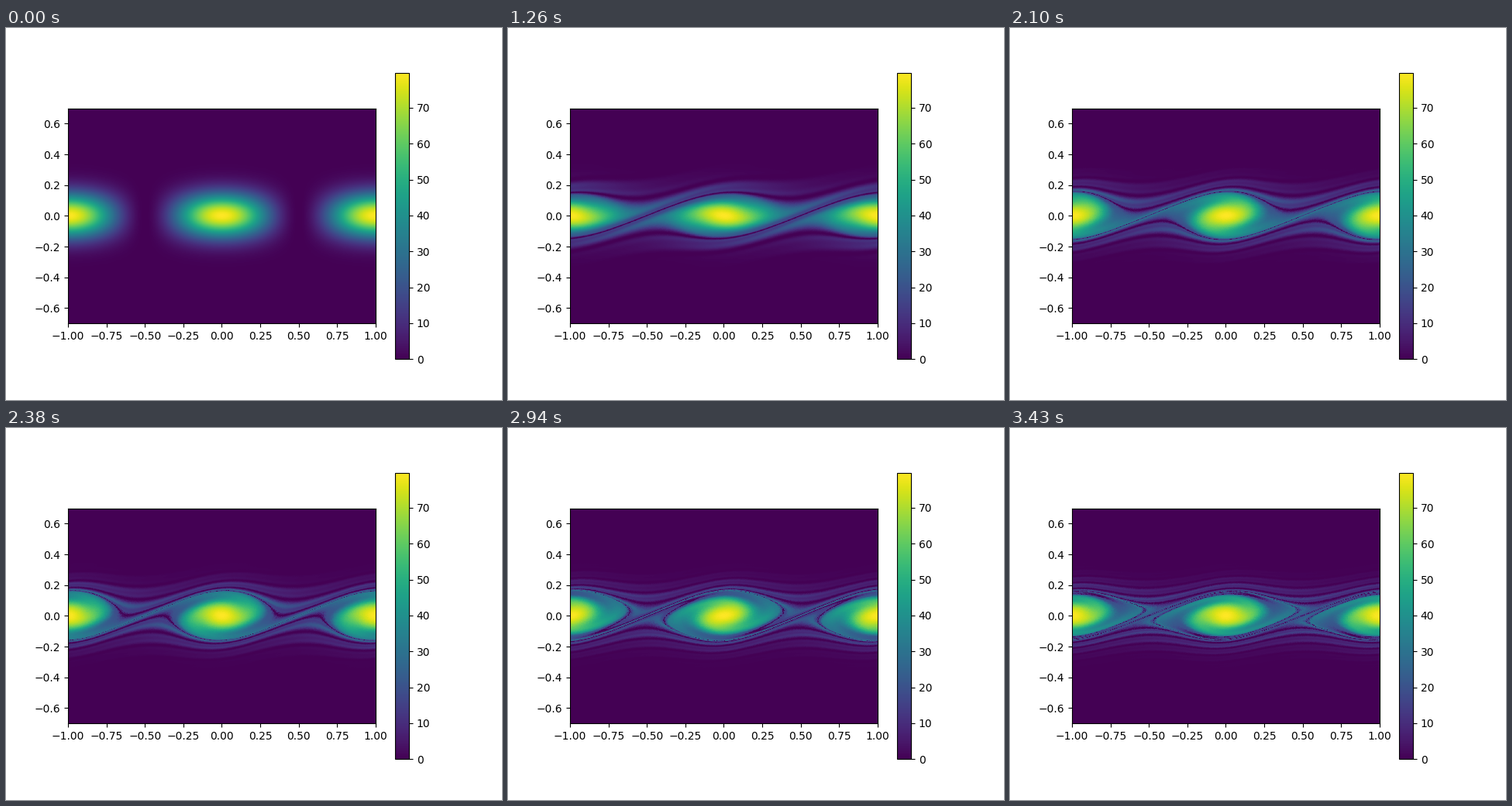
These frames come from a looping animation (640 px wide and 480 px high, 3.5 s). A matplotlib script:

```python
import numpy as np
import matplotlib.pyplot as plt
from matplotlib.animation import FuncAnimation

# Self-gravitating collisionless gas on an integer phase-space lattice:
# every step kicks the velocities, then drifts the positions.
FRAMES, INTERVAL = 50, 70
NX, NV = 1024, 2048          # one spatial period, full velocity range
V_MAX = 0.7
DT = 0.4
RHO, SIGMA, CONTRAST = 10.0, 0.1, 0.9999
K = 2 * np.pi
K_JEANS = K / 1.1
FOUR_PI_G = (K_JEANS * SIGMA) ** 2 / RHO

dx, dv = 1 / NX, 2 * V_MAX / NV
x = -1 + (np.arange(NX) + 0.5) * dx
v = -V_MAX + (np.arange(NV) + 0.5) * dv
cols = np.arange(NX)[None, :]
rows = np.arange(NV)[:, None]
drift_cols = (cols - np.rint(v * DT / dx).astype(int)[:, None]) % NX


def initial_state():
    maxwell = np.exp(-v**2 / (2 * SIGMA**2)) / np.sqrt(2 * np.pi * SIGMA**2)
    density = RHO * (1 + CONTRAST * np.cos(K * x))
    return np.outer(maxwell, density).astype(np.float32)


def gravity(f):
    rho_k = np.fft.rfft(f.sum(axis=0, dtype=float) * dv)
    k = K * np.arange(rho_k.size)
    g_k = np.zeros_like(rho_k)
    g_k[1:] = 1j * FOUR_PI_G * rho_k[1:] / k[1:]
    return np.fft.irfft(g_k, NX)


def step(f):
    shift = np.rint(gravity(f) * DT / dv).astype(int)
    kicked = f[(rows - shift[None, :]) % NV, cols]
    return np.take_along_axis(kicked, drift_cols, axis=1)


def simulate():
    f = initial_state()
    states = [f[::2, ::2].copy()]
    for _ in range(FRAMES - 1):
        f = step(f)
        states.append(f[::2, ::2].copy())
    return states


states = simulate()

fig, ax = plt.subplots(figsize=(6.4, 4.8), dpi=100)
image = ax.imshow(np.tile(states[0], 2), origin="lower", interpolation="nearest",
                  cmap="viridis", extent=[-1, 1, -V_MAX, V_MAX],
                  vmin=0, vmax=states[0].max())
fig.colorbar(image, ax=ax)


def update(i):
    image.set_data(np.tile(states[i], 2))
    return (image,)


anim = FuncAnimation(fig, update, frames=FRAMES, interval=INTERVAL, repeat=True)
plt.show()
```
